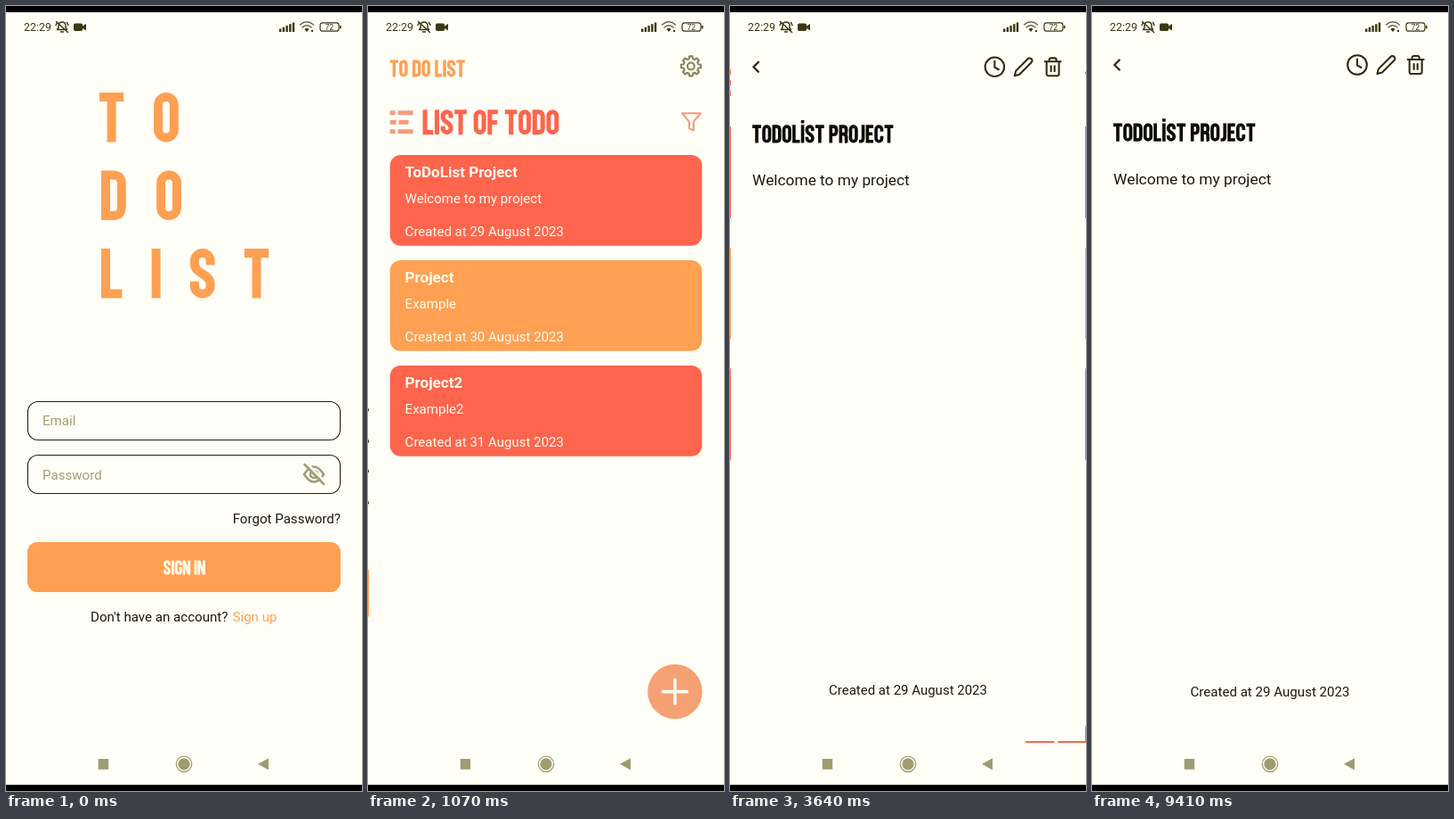
An HTML page for the animation above (9440 ms loop, 400 by 880 pixels).

```html
<!DOCTYPE html>
<html lang="en">
<head>
<meta charset="utf-8">
<title>To do list</title>
<style>
  html, body { margin: 0; width: 100%; height: 100%; overflow: hidden; background: #fffff8; }
  svg.stage { display: block; width: 100vw; height: 100vh; }
  text { font: 15.1px Roboto, sans-serif; fill: #1c1a08; }
  .line { fill: none; stroke: currentColor; stroke-width: 2.1; stroke-linecap: round; stroke-linejoin: round; }
  .glyphs { fill: none; stroke: currentColor; stroke-width: 18; }
  .page { fill: #fffff8; }
  .card text { fill: #fffdf0; }
  .card .name { font-size: 17.1px; font-weight: 700; }
  .hint { fill: #a09e74; }
  .status { color: #3b3812; }
  .dark { color: #2f2d10; }
  .tomato { color: #ff654c; }
  .orange { color: #ffa052; }

  /* Screens zoom about the middle of the content area. */
  .screen { transform-origin: 200px 428px; animation: 9440ms linear infinite both; }
  #login { animation-name: login; }
  #list { animation-name: list, show-list; }
  #detail { animation-name: detail, show-detail; }
  .warm { animation: warm 9440ms linear infinite both; }

  @keyframes login {
    0% { transform: none; }
    8.792% { transform: none; animation-timing-function: cubic-bezier(.3,0,.8,.15); }
    9.499% { transform: scale(1.06); animation-timing-function: cubic-bezier(.05,.7,.1,1); }
    13.03%, 100% { transform: scale(1.15); }
  }
  @keyframes list {
    0% { transform: scale(.85); }
    8.792% { transform: scale(.85); animation-timing-function: cubic-bezier(.3,0,.8,.15); }
    9.499% { transform: scale(.91); animation-timing-function: cubic-bezier(.05,.7,.1,1); }
    13.03% { transform: none; }
    36.33% { transform: none; animation-timing-function: cubic-bezier(.3,0,.8,.15); }
    37.04% { transform: scale(1.06); animation-timing-function: cubic-bezier(.05,.7,.1,1); }
    40.57%, 100% { transform: scale(1.15); }
  }
  @keyframes detail {
    0% { transform: scale(.85); }
    36.33% { transform: scale(.85); animation-timing-function: cubic-bezier(.3,0,.8,.15); }
    37.04% { transform: scale(.91); animation-timing-function: cubic-bezier(.05,.7,.1,1); }
    40.57%, 100% { transform: none; }
  }
  @keyframes show-list { 0%, 9.587% { opacity: 0; } 10.117%, 100% { opacity: 1; } }
  @keyframes show-detail { 0%, 37.13% { opacity: 0; } 37.66%, 100% { opacity: 1; } }
  @keyframes warm { 0%, 11.4% { color: var(--pale); } 12.7%, 100% { color: var(--full); } }
</style>
</head>
<body>
<svg class="stage" viewBox="0 0 400 880" preserveAspectRatio="none">
  <clipPath id="content"><rect y="33" width="400" height="793"/></clipPath>
  <rect class="page" width="400" height="880"/>

  <g clip-path="url(#content)">
    <g id="login" class="screen">
      <rect class="page" y="33" width="400" height="793"/>
      <g class="orange">
        <g data-title="TO" data-at="105 97 55.5 61"></g>
        <g data-title="DO" data-at="107 184.5 55.5 62"></g>
        <g data-title="LIST" data-at="107 272 55.5 60"></g>
      </g>
      <g fill="none" stroke="#22200a" stroke-width="1.1">
        <rect x="24.5" y="443.5" width="351" height="43" rx="11.5"/>
        <rect x="24.5" y="503.5" width="351" height="43" rx="11.5"/>
      </g>
      <text class="hint" x="41" y="470">Email</text>
      <text class="hint" x="41" y="530.5">Password</text>
      <g class="line" color="#a09e74" style="stroke-width:2.6">
        <path d="M335 525Q346 508 357 525Q346 542 335 525Z"/>
        <circle cx="346" cy="525" r="4"/>
        <path d="M338 513L360 535" stroke="#fffff8"/>
        <path d="M335.5 514L357 536"/>
      </g>
      <text x="376" y="580" text-anchor="end">Forgot Password?</text>
      <rect x="24" y="601" width="352" height="56" rx="11.5" fill="#ffa052"/>
      <g color="#fffbe8" data-title="SIGN IN" data-at="177 621.5 16 6"></g>
      <text x="95" y="690">Don't have an account?</text>
      <text x="254.5" y="690" style="fill:#ffa052">Sign up</text>
    </g>

    <g id="list" class="screen">
      <rect class="page" y="33" width="400" height="793"/>
      <g class="orange" data-title="TO DO LIST" data-at="24 59 19 6"></g>
      <g class="warm" style="--pale:#86845a;--full:#33300f">
        <path id="gear" class="line"/>
        <circle class="line" cx="363.5" cy="66" r="3.9"/>
      </g>
      <path class="warm" style="--pale:#f79a7c;--full:#ff6a50" fill="currentColor"
        d="M24 116h6v5h-6zM33 116h17v5h-17zM24 126.5h7v5h-7zM34 126.5h11v5h-11zM24 137h6v5h-6zM33 137h17v5h-17z"/>
      <g class="tomato" data-title="LIST OF TODO" data-at="61 115 28 6"></g>
      <g class="warm" style="--pale:#f79a7c;--full:#ff6a50">
        <path class="line" d="M353.5 119H374.5L366.5 128.5V138.5L361.5 136V128.5Z"/>
      </g>
      <g id="cards"></g>
      <g class="warm" style="--pale:#f6a173;--full:#ff654c">
        <circle cx="345.5" cy="770" r="30.8" fill="currentColor"/>
        <path d="M332 770H359M345.5 756.5V783.5" stroke="#fffdf0" stroke-width="3.6" stroke-linecap="round"/>
      </g>
    </g>

    <g id="detail" class="screen dark">
      <rect class="page" y="33" width="400" height="793"/>
      <path class="line" d="M30.8 60.5L25.3 66L30.8 71.5" style="stroke-width:2.4"/>
      <g class="line">
        <circle cx="298" cy="66" r="10.8"/>
        <path d="M298 59.5V66.5L302.5 69"/>
        <path transform="translate(318.5 54)" d="M17 3a2.83 2.83 0 1 1 4 4L7.5 20.5 2 22l1.5-5.5z"/>
        <path transform="translate(351.7 54)" d="M3 6H21M19 6V20a2 2 0 0 1-2 2H7a2 2 0 0 1-2-2V6M8 6V4a2 2 0 0 1 2-2h4a2 2 0 0 1 2 2V6M10 11V17M14 11V17"/>
      </g>
      <g color="#0c0b04" data-title="TODOİLST" hidden></g>
      <g color="#0c0b04" data-title="TODOLİST PROJECT" data-at="24 131.5 20.3 6"></g>
      <text x="24" y="200" style="font-size:17.4px">Welcome to my project</text>
      <text x="200" y="774" text-anchor="middle">Created at 29 August 2023</text>
    </g>
  </g>

  <g class="status">
    <text x="20" y="28" style="font-size:12.4px;fill:currentColor">22:29</text>
    <g class="line" style="stroke-width:1.5">
      <path d="M57.5 26.5H68.5L67 24.5V21.5Q66.5 18 63 18T59 21.5V24.5ZM61.5 29H64.5M56.5 17.5L69.5 29.5M56 21.5L57.5 18.5M70 21.5L68.5 18.5"/>
      <path d="M330.5 21Q338 14.5 345.5 21M333 24Q338 19.5 343 24" opacity=".75"/>
      <rect x="353" y="18.8" width="21" height="9.4" rx="2.8" style="stroke-width:1.2"/>
    </g>
    <g fill="currentColor">
      <rect x="76" y="19.5" width="10" height="8.5" rx="1.8"/>
      <path d="M86 22.5L90 20V27.5L86 25ZM335.5 26Q338 23.5 340.5 26L338 29ZM343 27h2v2h-2zM375 22h1.6v3.2h-1.6z"/>
      <path d="M307 25.5h2.4v3.5h-2.4zM310.7 23.8h2.4v5.2h-2.4zM314.4 22h2.4v7h-2.4zM318.1 20.2h2.4v8.8h-2.4zM321.8 18.4h2.4v10.6h-2.4z"/>
      <text x="363.3" y="26.6" text-anchor="middle" style="font-size:8.6px;fill:currentColor">72</text>
    </g>
  </g>
  <g fill="#9f9c70">
    <rect x="103.7" y="844" width="11.5" height="11.8"/>
    <circle cx="200" cy="849.8" r="6.6"/>
    <circle cx="200" cy="849.8" r="8.7" fill="none" stroke="#9f9c70" stroke-width="1.3"/>
    <path d="M283 849.8L295 843.2V856.4Z"/>
  </g>
  <path d="M0 0H400V7H0ZM0 873H400V880H0Z"/>
</svg>

<script>
  // Condensed capitals, 100 units tall: [advance width, centre-line path].
  const capitals = {
    T: [49, 'M0 9H49M24.5 9V100'],
    O: [50, 'M9 25a16 16 0 0 1 32 0V75a16 16 0 0 1-32 0Z'],
    D: [50, 'M9 9H24Q41 9 41 26V74Q41 91 24 91H9Z'],
    L: [42, 'M9 0V91H42'],
    I: [18, 'M9 0V100'],
    'İ': [18, 'M9 0V100M9-26V-9'],
    S: [50, 'M41 33V25a16 16 0 0 0-32 0v5C9 52 41 50 41 72v3a16 16 0 0 1-32 0v-9'],
    F: [42, 'M42 9H9V100M9 51H38'],
    E: [42, 'M42 9H9V91H42M9 49H37'],
    P: [49, 'M9 100V9H24Q40 9 40 25V38Q40 54 24 54H9'],
    R: [49, 'M9 100V9H24Q40 9 40 25V36Q40 51 24 51H9M24 51Q40 51 40 66V84Q40 95 42 100'],
    J: [32, 'M23 0V75Q23 91 8 91H0'],
    C: [50, 'M41 37V25a16 16 0 0 0-32 0V75a16 16 0 0 0 32 0V62'],
    G: [50, 'M41 35V25a16 16 0 0 0-32 0V75a16 16 0 0 0 32 0V56H27'],
    N: [52, 'M8 100V0M44 100V0M11 4L41 96'],
  };

  function drawTitle(group) {
    const [x, y, height, gap] = group.dataset.at.split(' ').map(Number);
    let pen = 0, paths = '';
    for (const char of group.dataset.title) {
      if (char === ' ') { pen += 22; continue; }
      const [width, d] = capitals[char];
      paths += `<path transform="translate(${pen})" d="${d}"/>`;
      pen += width + gap;
    }
    group.setAttribute('role', 'img');
    group.setAttribute('aria-label', group.dataset.title);
    group.innerHTML =
      `<g class="glyphs" transform="translate(${x} ${y}) scale(${height / 100})">${paths}</g>`;
  }

  function gearPath(cx, cy, teeth) {
    const points = [];
    for (let i = 0; i < teeth; i++) {
      for (const [offset, radius] of [[-.32, 8.6], [-.2, 11.2], [.2, 11.2], [.32, 8.6]]) {
        const angle = (i + offset) / teeth * 2 * Math.PI;
        points.push(`${(cx + radius * Math.sin(angle)).toFixed(2)} ${(cy - radius * Math.cos(angle)).toFixed(2)}`);
      }
    }
    return `M${points.join('L')}Z`;
  }

  const card = ([name, note, day, color], i) => `
    <g class="card" transform="translate(24 ${166 + i * 118.5})">
      <rect width="352" height="102" rx="12" fill="${color}"/>
      <text class="name" x="17" y="25">${name}</text>
      <text x="17" y="54.5">${note}</text>
      <text x="17" y="91.5">Created at ${day} August 2023</text>
    </g>`;

  document.querySelectorAll('[data-at]').forEach(drawTitle);
  document.querySelectorAll('[hidden]').forEach(node => node.remove());
  document.getElementById('gear').setAttribute('d', gearPath(363.5, 66, 8));
  document.getElementById('cards').innerHTML = [
    ['ToDoList Project', 'Welcome to my project', 29, '#ff654c'],
    ['Project', 'Example', 30, '#ffa052'],
    ['Project2', 'Example2', 31, '#ff654c'],
  ].map(card).join('');
</script>
</body>
</html>
```
